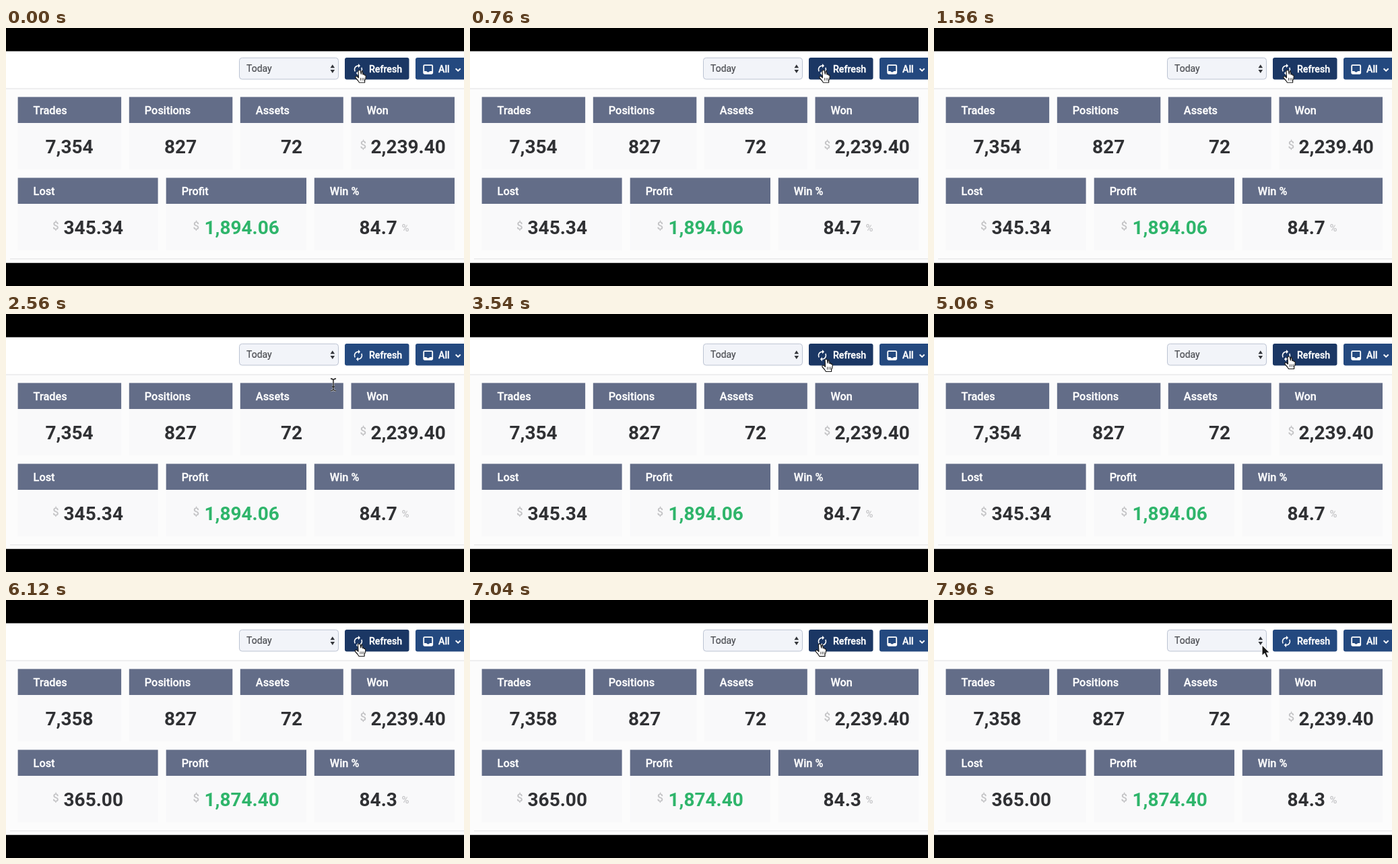
Recreate the animation shown at these times as an HTML page. Size 680x383 px, loop 8 s.

```html
<!DOCTYPE html>
<html lang="en">
<head>
<meta charset="utf-8">
<title>Trading dashboard</title>
<style>
  html, body { margin: 0; width: 100%; height: 100%; overflow: hidden; background: #000; }
  svg { display: block; width: 100vw; height: 100vh; font-family: Roboto, sans-serif; }
  /* Slightly soft edges, like a scaled screen recording */
  #screen { filter: blur(.35px); }
  .label { font-size: 16.3px; font-weight: 500; fill: #fff; stroke: #fff; stroke-width: .3; }
  .value { font-size: 28px; font-weight: 700; fill: #303134; }
  .profit { fill: #2fb56b; }
  .unit { font-weight: 500; fill: #c4c4c6; }
  .button { font-size: 14.2px; font-weight: 500; fill: #fff; stroke: #fff; stroke-width: .35; }
</style>
</head>
<body>
<svg viewBox="0 0 680 383">
  <rect y="34.5" width="680" height="314" fill="#fff"/>
  <g id="screen">
    <rect y="90" width="680" height="258.5" fill="#fcfcfc"/>
    <path d="M0 90H680M6 342.8H680" stroke="#e0e0e2"/>

    <rect x="346.5" y="44.3" width="147" height="31.7" rx="4" fill="#f2f4f9" stroke="#bcc3d2"/>
    <text x="357" y="65.2" font-size="14" fill="#4a4c51" stroke="#4a4c51" stroke-width=".2">Today</text>
    <path d="M481.5 59.3l3.3-5 3.3 5zm0 2.6h6.6l-3.3 5z" fill="#34363b"/>

    <rect id="refresh" x="503" y="44" width="95.5" height="32.5" rx="3"/>
    <path transform="translate(513.6 52.2) scale(.78)" fill="#fff" d="M12 6v3l4-4-4-4v3c-4.42 0-8 3.58-8 8 0 1.57.46 3.03 1.24 4.26L6.7 14.8c-.45-.83-.7-1.79-.7-2.8 0-3.31 2.69-6 6-6zm6.76 1.74L17.3 9.2c.44.84.7 1.79.7 2.8 0 3.31-2.69 6-6 6v-3l-4 4 4 4v-3c4.42 0 8-3.58 8-8 0-1.57-.46-3.03-1.24-4.26z"/>
    <text class="button" x="539" y="66.2">Refresh</text>

    <rect x="608" y="44" width="80" height="32.5" rx="3" fill="#24497f"/>
    <rect x="620.2" y="55.2" width="13" height="12.6" rx="1.2" fill="none" stroke="#fff" stroke-width="1.8"/>
    <path d="M620 64h4.2q2.5 3 5 0h4v3h-13.200z" fill="#fff"/>
    <text class="button" x="642" y="66.2">All</text>
    <path d="M667.700 60.200l3.500 3.500 3.500-3.500" fill="none" stroke="#fff" stroke-width="2"/>

    <g id="cards"></g>

    <g id="hand" stroke="#1c1c1c" stroke-width="1.2" stroke-linejoin="round">
      <path fill="#fff" d="M-1 1Q.8-1 2.300 1L3.300 6Q5-4.500 5.900 6.500 7.800 5.200 8.300 7.500 10.300 7 10.300 9.500L9.800 13 8.600 15.500V18.500H.5L-1.500 15.500-5 11.500Q-5.500 8.500-3 9.300L-.5 11.300z"/>
      <path fill="none" d="M2.500 11.500v4M5 11.500v4M7.400 11.500v4" stroke-width=".8"/>
    </g>
    <path id="arrow" d="M0 0V16.500L3.800 13 6.600 19.200 9.600 17.900 6.900 11.900H11.800z" fill="#151515" stroke="#fff" stroke-width="1.1"/>
    <g id="beam" fill="none">
      <path d="M-4-9Q-1-9 0-7 1-9 4-9M0-7V7M-4 9Q-1 9 0 7 1 9 4 9M-2 3H2" stroke="#ddd" stroke-width="2.600"/>
      <path d="M-4-9Q-1-9 0-7 1-9 4-9M0-7V7M-4 9Q-1 9 0 7 1 9 4 9M-2 3H2" stroke="#222" stroke-width="1.400"/>
    </g>
  </g>
</svg>
<script>
const LOOP = 8000;
const UPDATE_AT = 5500;
const $ = id => document.getElementById(id);

// Label, header box, value position, values before and after the refresh, unit
const cards = [
  { label: 'Trades', x: 17.6, y: 102.4, w: 153.5, at: 58.5, values: ['7,354', '7,358'] },
  { label: 'Positions', x: 182.8, y: 102.4, w: 153.5, at: 235, values: ['827'] },
  { label: 'Assets', x: 347.8, y: 102.4, w: 153, at: 408, values: ['72'] },
  { label: 'Won', x: 512.5, y: 102.4, w: 153.5, at: 541.5, values: ['2,239.40'], unit: '$', unitX: 525.5 },
  { label: 'Lost', x: 17.6, y: 222.4, w: 208, at: 85.5, values: ['345.34', '365.00'], unit: '$', unitX: 69 },
  { label: 'Profit', x: 237.7, y: 222.4, w: 208.3, at: 294.5, values: ['1,894.06', '1,874.40'], unit: '$', unitX: 277.5 },
  { label: 'Win %', x: 457.8, y: 222.4, w: 208.2, at: 524.5, values: ['84.7', '84.3'], unit: '%', unitX: 587.5 }
];

// Pointer stops: time, x, y
const stops = [
  [0, 524, 62.5], [1680, 524, 62.5], [2380, 486, 105], [2600, 486, 105],
  [3300, 528, 67], [4240, 528, 67], [5000, 526, 63], [5300, 526, 63],
  [5900, 523.5, 65], [6900, 523.5, 65], [7500, 487, 66.5], [LOOP, 487, 66.5]
];

function add(tag, attributes, text = '') {
  const node = document.createElementNS('http://www.w3.org/2000/svg', tag);
  for (const name in attributes) node.setAttribute(name, attributes[name]);
  node.textContent = text;
  $('cards').append(node);
  return node;
}

for (const card of cards) {
  const { x, y, w, label, unit } = card;
  add('rect', { x, y: y + 38, width: w, height: 70, fill: '#f9f9fa' });
  add('rect', { x, y, width: w, height: 38.6, fill: '#636d88' });
  add('text', { class: 'label', x: x + 23, y: y + 25.5 }, label);
  card.node = add('text', {
    class: label === 'Profit' ? 'value profit' : 'value', x: card.at, y: y + 83.7
  });
  if (unit) {
    const dollar = unit === '$';
    add('text', {
      class: 'unit', x: card.unitX, y: y + (dollar ? 77 : 79.7), 'font-size': dollar ? 17 : 15
    }, unit);
  }
}

function pointerAt(time) {
  const i = stops.findIndex(stop => stop[0] > time);
  const [t0, x0, y0] = stops[i - 1];
  const [t1, x1, y1] = stops[i];
  const p = (time - t0) / (t1 - t0);
  const ease = p * p * (3 - 2 * p);
  return [x0 + (x1 - x0) * ease, y0 + (y1 - y0) * ease];
}

function draw(time) {
  for (const { node, values } of cards) {
    node.textContent = values[time < UPDATE_AT ? 0 : values.length - 1];
  }
  const [x, y] = pointerAt(time);
  const hover = x >= 503 && y >= 44 && y <= 76.5;
  const shape = hover ? 'hand' : y > 98 ? 'beam' : 'arrow';
  for (const id of ['hand', 'arrow', 'beam']) {
    $(id).style.display = id === shape ? '' : 'none';
  }
  $(shape).setAttribute('transform', `translate(${x} ${y})`);
  $('refresh').setAttribute('fill', hover ? '#1b3764' : '#24497f');
}

const start = performance.now();
function tick() {
  draw((performance.now() - start) % LOOP);
  requestAnimationFrame(tick);
}
tick();
</script>
</body>
</html>
```
